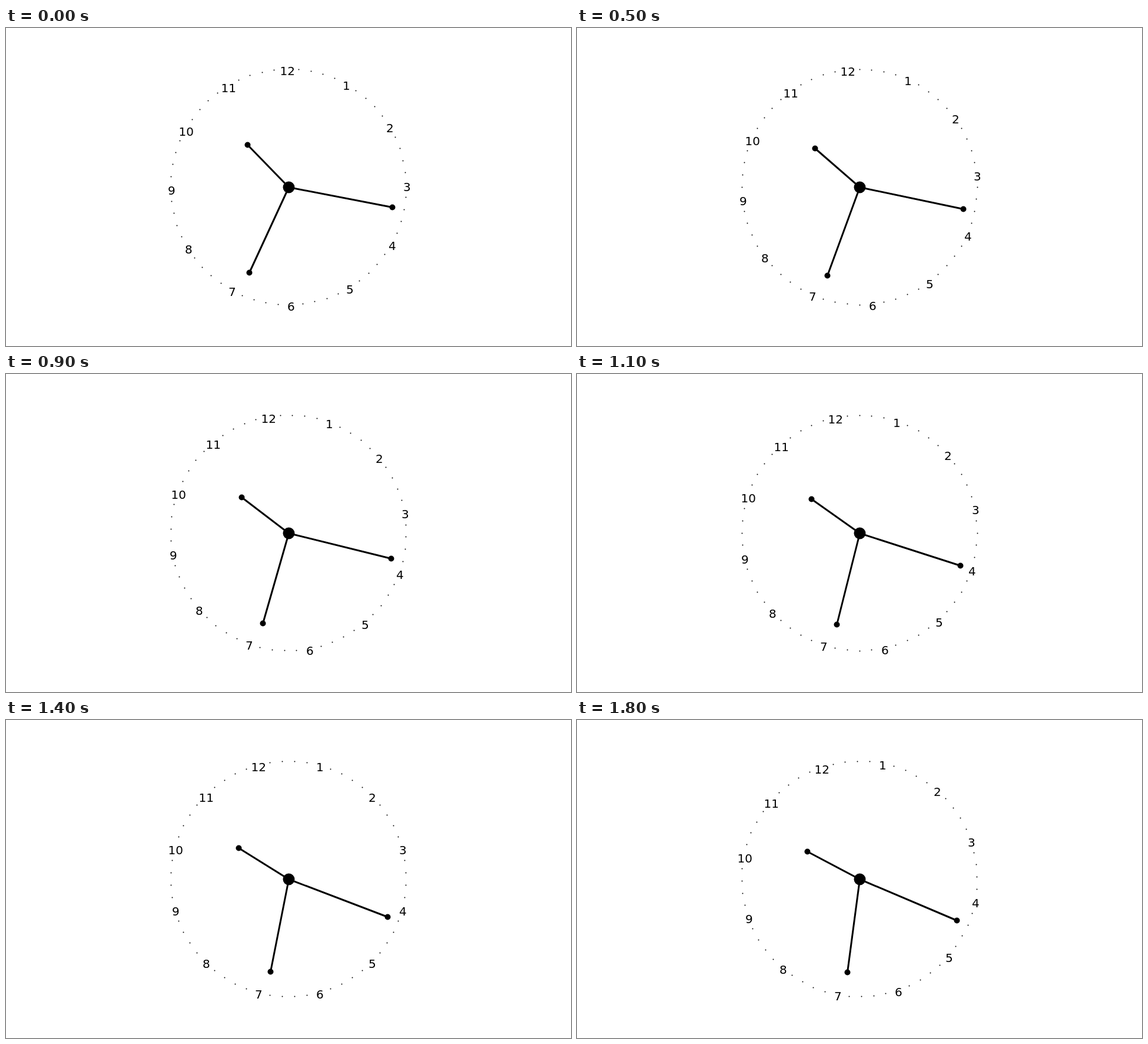
These frames come from a looping animation (960 by 540 pixels, 1.9 s). An HTML page:

```html
<!DOCTYPE html>
<html lang="en">
<head>
<meta charset="utf-8">
<title>Turning clock</title>
<style>
  html, body { margin: 0; width: 100%; height: 100%; overflow: hidden; background: #fff; }
  svg { display: block; width: 960px; height: 540px; }
  text { font: 20px "DejaVu Sans", sans-serif; text-anchor: middle; }
</style>
</head>
<body>
<svg id="stage" viewBox="0 0 960 540"></svg>
<script>
const STEP = 100, STEPS = 19;
const CX = 480, CY = 270, RADIUS = 200;
const stage = document.getElementById("stage");

function add(tag, attrs) {
  const el = document.createElementNS("http://www.w3.org/2000/svg", tag);
  set(el, attrs);
  return stage.appendChild(el);
}

function set(el, attrs) {
  for (const key in attrs) el.setAttribute(key, attrs[key]);
}

// Degrees run clockwise from the top.
function polar(deg, r) {
  const a = deg * Math.PI / 180;
  return [CX + r * Math.sin(a), CY - r * Math.cos(a)];
}

// Shapes sit on pixel centres.
const snap = v => Math.floor(v + 1e-6) + 0.5;

const marks = Array.from({ length: 60 }, (_, n) => {
  if (n % 5) return add("circle", { r: 1 });
  const label = add("text", {});
  label.textContent = n / 5 || 12;
  return label;
});

const hands = [100, 160, 180].map(length => ({
  length,
  line: add("line", { x1: snap(CX), y1: snap(CY), stroke: "#000", "stroke-width": 3 }),
  tip: add("circle", { r: 5 })
}));
add("circle", { cx: snap(CX), cy: snap(CY), r: 10 });

function draw(ms) {
  const i = Math.floor(ms / STEP) % STEPS;
  const turn = -1 - i;

  marks.forEach((el, n) => {
    const [x, y] = polar(n * 6 + turn, RADIUS);
    if (n % 5) set(el, { cx: snap(x), cy: snap(y) });
    else set(el, { x: Math.round(x) + 1.25, y: Math.round(y) + 10 });
  });

  // The time starts at 10:34:17 and ticks every four steps.
  const sec = 17 + Math.floor((i + 2) / 4);
  const min = 34 + sec / 60;
  const angles = [300 + Math.floor(min) / 2, min * 6, sec * 6];
  hands.forEach(({ length, line, tip }, n) => {
    const [x, y] = polar(angles[n] + turn, length).map(snap);
    set(line, { x2: x, y2: y });
    set(tip, { cx: x, cy: y });
  });
}

const start = performance.now();
function tick(now) {
  draw(Math.max(0, now - start));
  requestAnimationFrame(tick);
}
draw(0);
requestAnimationFrame(tick);
</script>
</body>
</html>
```
